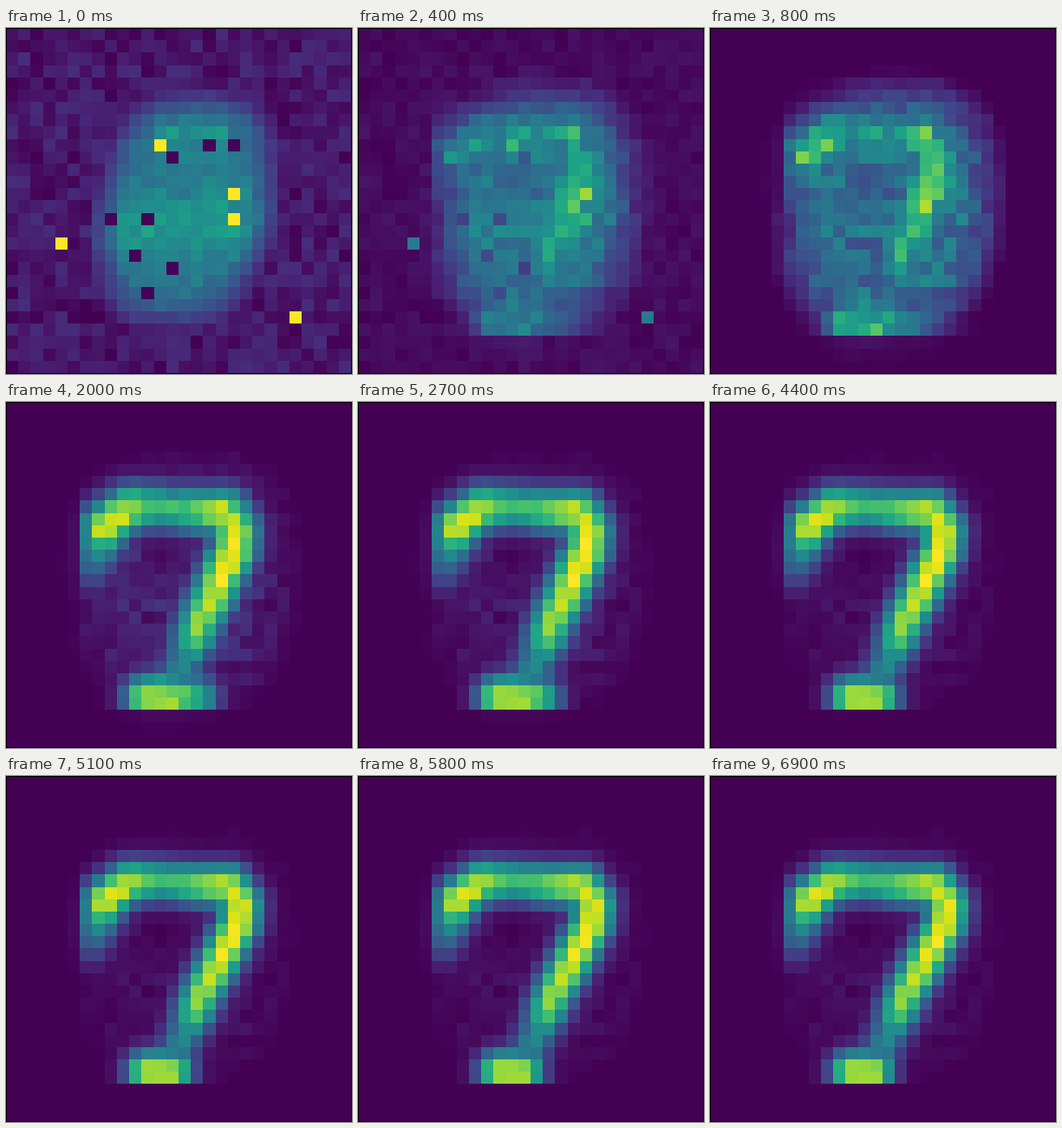
Write a matplotlib script that moves like this. It is 371 px wide and 370 px high and loops after 7 s.

```python
import numpy as np
import matplotlib.pyplot as plt
from matplotlib.animation import FuncAnimation
from matplotlib.patches import Rectangle

W, H, DPI = 371, 370, 100
N = 28
FRAMES, STEP_MS = 70, 100
START, END = 0.8, 6.9  # seconds: noise has cleared, digit is finished

ys, xs = np.mgrid[:N, :N]
rng = np.random.default_rng(11)
grain = rng.random((N, N))
static = rng.random((N, N))
fine = rng.normal(0, 1, (N, N)).clip(-2, 2)

# Key points of the digit: x, y, strength
SEVEN = np.array([
    (6.4, 13.4, .22), (7, 11.3, .55), (7.6, 9.5, 1), (9.5, 8.1, .9),
    (12.3, 8, .63), (14.8, 8.3, .78), (17.8, 8.4, .92), (18.8, 9.8, 1),
    (18.6, 11.5, 1), (17.5, 13.6, .97), (15.6, 16.8, .88), (14.9, 18.3, .8),
    (14.2, 20, .48), (13.4, 21.6, .46),
])
HOT = [(12, 9), (18, 13), (18, 15), (4, 17), (23, 23)]
DEAD = [(16, 9), (18, 9), (13, 10), (11, 15), (8, 15), (10, 18), (13, 19), (11, 21)]


def lerp(a, b, u):
    return a + (b - a) * u


def decay(t, tau):
    return np.exp(-(t - START) / tau)


def stroke(points, spread):
    """Soft line through points, brightest along its middle."""
    t = np.linspace(0, len(points) - 1, 12 * len(points))
    x, y, a = (np.interp(t, np.arange(len(points)), col) for col in points.T)
    d2 = (xs[..., None] - x) ** 2 + (ys[..., None] - y) ** 2
    return (a * np.exp(-d2 / (2 * spread ** 2))).max(axis=2)


def blob(rx, ry, edge, tilt=0.12):
    """Leaning rounded box with a soft rim."""
    dx = np.abs(xs - 14.1 - tilt * (14 - ys)) / rx
    dy = np.abs(ys - 14.2) / ry
    q = (dx ** 2.6 + dy ** 2.6) ** (1 / 2.6)
    return np.clip((1 - q) / edge, 0, 1)


def noise_field():
    bands = 0.46 + 0.06 * np.cos((ys - 6.5) * 2 * np.pi / 9)
    glow = bands * blob(8.2, 10.6, 0.4) * (1 + 0.08 * fine)
    field = np.maximum(glow, 0.13 * static)
    for cells, value in ((HOT, 1), (DEAD, 0.01)):
        cols, rows = zip(*cells)
        field[rows, cols] = value
    return field


def digit_field(t):
    early = decay(t, 1.8)
    late = (t - START) / (END - START)

    path = SEVEN.copy()
    path[:, 0] += 0.2 * (late - 1) * np.maximum(path[:, 0] - 15, 0)
    foot = np.array([(11, 23.5, .94), (12.5, 23.5, .94),
                     (lerp(12.6, 17, early), 23.5, lerp(.94, .45, early))])
    spread = 1.18 + 0.3 * early
    ink = np.maximum(stroke(path, spread), stroke(foot, spread))
    ink[:, :6] *= 0.2
    ink *= lerp(1, 0.72, decay(t, 0.5)) * (1 + (0.02 + 0.12 * decay(t, 0.8)) * fine)

    contrast = 1 - 0.5 * decay(t, 1)
    haze = 0.06 + 0.42 * decay(t, 0.8)
    haze = haze * (1 - contrast + contrast * grain) * blob(9.6, 11.4, 0.35, 0.06)

    field = np.maximum(ink, haze)
    field[25:] *= 0.1 * early
    return field


def field_at(t):
    if t >= START:
        return digit_field(t)
    return lerp(noise_field(), digit_field(START), (t / START) ** 0.75)


fig = plt.figure(figsize=(W / DPI, H / DPI), dpi=DPI)
ax = fig.add_axes([0, 1 / H, (W - 1) / W, (H - 1) / H])
ax.axis("off")
image = ax.imshow(field_at(0), cmap="viridis", vmin=0, vmax=1,
                  interpolation="nearest", aspect="auto")

# One-pixel border
for x, y, w, h in [(0, 0, 1, H), (W - 1, 0, 1, H), (0, 0, W, 1), (0, H - 1, W, 1)]:
    fig.add_artist(Rectangle((x / W, y / H), w / W, h / H, fc="black", lw=0, zorder=5))


def update(frame):
    image.set_data(field_at(frame * STEP_MS / 1000))
    return [image]


anim = FuncAnimation(fig, update, frames=FRAMES, interval=STEP_MS,
                     repeat=True, repeat_delay=0)
plt.show()
```
